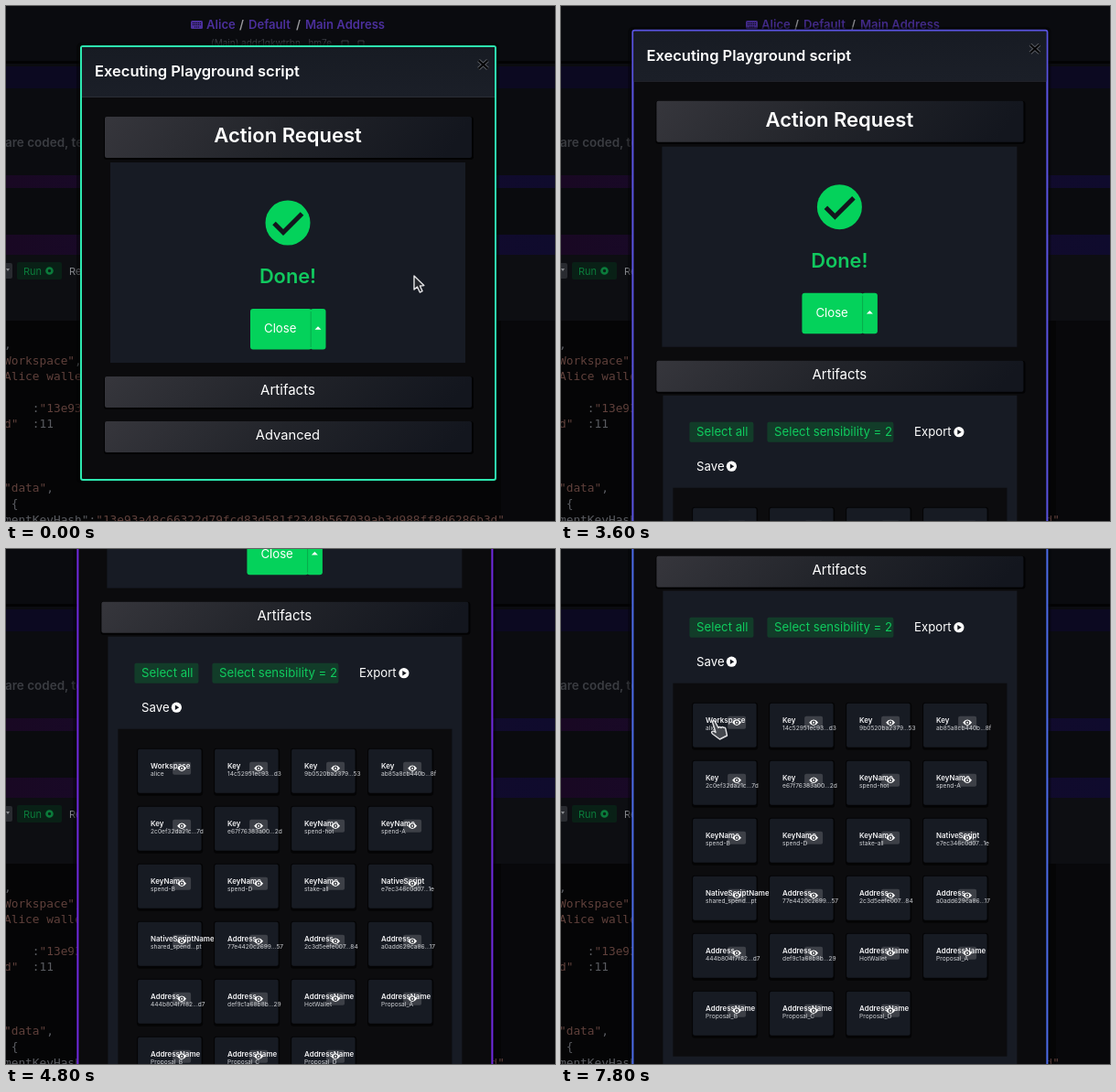
Recreate the animation shown at these times as an HTML page. Size 600 by 563 pixels, loop 8000 ms.

```html
<!DOCTYPE html>
<html lang="en">
<head>
<meta charset="utf-8">
<title>Playground dialog</title>
<style>
  html, body { margin: 0; width: 100%; height: 100%; overflow: hidden; background: #0a0b0f; }
  svg { display: block; width: 100vw; height: 100vh; font-family: Inter, sans-serif; }
  text { white-space: pre; }
  .code { font: 12.8px "DejaVu Sans Mono", monospace; fill: #595b60; }
  .str { fill: #5f403b; }
  .mid { text-anchor: middle; }
  .name { font-size: 7.9px; font-weight: 600; fill: #f2f2f4; }
  .value { font-size: 6.6px; fill: #d2d4d8; }
</style>
</head>
<body>
<svg viewBox="0 0 600 563">
  <defs>
    <linearGradient id="bar" x2="1" y2=".08">
      <stop stop-color="#36363c"/><stop offset=".5" stop-color="#22242a"/><stop offset="1" stop-color="#13161e"/>
    </linearGradient>
    <linearGradient id="band">
      <stop stop-color="#190823"/><stop offset=".3" stop-color="#180a2b"/><stop offset="1" stop-color="#0f0b2d"/>
    </linearGradient>
    <linearGradient id="head" x2="0" y2="1">
      <stop stop-color="#171b23"/><stop offset="1" stop-color="#1b1f28"/>
    </linearGradient>
    <g id="play">
      <circle r="5.6" fill="#fff"/><path d="M-1.6-2.8 2.8 0-1.6 2.8Z" fill="#14171e"/>
    </g>
    <g id="eye">
      <path d="M-5 0Q0-6.4 5 0Q0 6.4-5 0Z" fill="#fff"/>
      <circle r="2.2" fill="#34363c"/><circle r="1" fill="#fff"/>
    </g>
  </defs>

  <g id="page">
    <rect width="600" height="563" fill="#0b0c10"/>
    <rect width="600" height="61" fill="#0a0b0f"/>
    <rect y="60" width="600" height="3" fill="#030304"/>
    <rect y="66" width="600" height="24" fill="#0c0921"/>
    <rect y="185" width="600" height="14" fill="url(#band)"/>
    <rect y="199" width="600" height="51" fill="#0a0b0e"/>
    <rect y="250" width="600" height="22" fill="url(#band)"/>
    <rect y="272" width="600" height="72" fill="#0d0e12"/>
    <rect y="344" width="541" height="219" fill="#050506"/>
    <rect x="541" y="344" width="59" height="219" fill="#08080b"/>
    <g id="crumbs" font-size="13.1" font-weight="600" fill="#4b2f9c">
      <rect x="202" y="16" width="13" height="9" rx="1.5"/>
      <path d="M204 18.5h9M204 20.5h9M206 23h5" stroke="#0a0b0f" stroke-dasharray="1.2 .8"/>
      <text x="219" y="25">Alice</text><text x="265" y="25">Default</text><text x="327" y="25">Main Address</text>
      <g fill="#9a9a9e"><text x="255" y="25">/</text><text x="317" y="25">/</text></g>
      <text x="224" y="44" font-size="10" font-weight="400" fill="#383a40">(Main) addr1qkwtrbn...hm7e</text>
      <path d="M367 38h7v6h-7zM385 38h6v6h-6z" fill="none" stroke="#383a40"/>
    </g>
    <text x="-1" y="154" font-size="13.5" font-weight="600" fill="#3a3c41">are coded, tested</text>
    <rect x="-6" y="281" width="13" height="17" rx="2" fill="#292b30"/>
    <path d="M0 287h4l-2 3z" fill="#8a8c90"/>
    <rect x="12" y="280" width="49" height="19" rx="2" fill="#092016"/>
    <text x="19" y="293.5" font-size="11" fill="#0b7b3b">Run</text>
    <circle cx="47.500" cy="289.500" r="3" fill="none" stroke="#0b7b3b" stroke-width="2.6"/>
    <text x="69" y="293.5" font-size="11" fill="#86888d">Reset</text>
    <g id="code"></g>
  </g>

  <g id="dialog">
    <rect id="shade" x="77" y="40" width="462" height="482" rx="5" fill="#000" opacity=".4"/>
    <rect id="frame" x="82" y="44" width="453" height="474" rx="2" fill="#0b0b0d" stroke-width="2"/>
    <rect x="83" y="45" width="451" height="54" fill="url(#head)"/>
    <rect x="83" y="99" width="451" height="1" fill="#2a2d35"/>
    <text x="97" y="77" font-size="16.5" font-weight="600" fill="#fff">Executing Playground script</text>
    <path d="M516.500 59.500l10 9m0-9l-10 9" stroke="#5a5d64" stroke-width="4"/>
    <path d="M516.500 59.500l10 9m0-9l-10 9" stroke="#050506" stroke-width="2.2"/>
    <g id="bars"></g>
    <rect x="114" y="171" width="388" height="219" fill="#171b24"/>
    <circle cx="308" cy="237" r="24.5" fill="#04d25b"/>
    <path d="M293 237.500l10 10 20.500-20.500" fill="none" stroke="#12161d" stroke-width="5"/>
    <text class="mid" x="308" y="303" font-size="21.8" font-weight="600" fill="#11c95f">Done!</text>
    <rect x="267" y="331" width="67" height="44.500" rx="3" fill="#04d25b"/>
    <rect x="332.500" y="331" width="17" height="44.500" rx="3" fill="#04d25b"/>
    <path d="M333.200 334v39" stroke="#08a94c"/>
    <path d="M337.500 353.800h7l-3.500-3.600z" fill="#fff"/>
    <text x="282" y="357.3" font-size="13.2" fill="#fff">Close</text>
    <g id="artifacts">
      <rect x="115" y="443" width="387" height="560" fill="#171b24"/>
      <g font-size="13.200" fill="#10cb5e">
        <rect x="144" y="472" width="70" height="22" rx="2" fill="#123c29"/>
        <rect x="229" y="472" width="138" height="22" rx="2" fill="#123c29"/>
        <text x="151.700" y="487.300">Select all</text>
        <text x="236.700" y="487.300">Select sensibility = 2</text>
        <g fill="#fff"><text x="389.700" y="487.800">Export</text><text x="151.700" y="525.300">Save</text></g>
      </g>
      <use href="#play" x="438.500" y="483"/>
      <use href="#play" x="190" y="520.500"/>
      <rect x="126" y="544" width="365" height="408" fill="#0c0c0e"/>
      <g id="cards"></g>
    </g>
  </g>

  <g id="cursor" stroke-linejoin="round" stroke="#e4e4e6" stroke-width="1.4">
    <path id="arrow" fill="#24262b" d="M0 0v15l3.500-3 2.800 6 2.800-1.300-2.700-5.700 4.400-.4z"/>
    <path id="hand" fill="#45484e" d="M-2.500 1Q-2-1 0 0L4 7.500Q5 5.500 7 7.500Q8 5.700 9.800 7.400Q11.500 6.500 12 9L13.500 16L5.500 20L-.5 15.500Q-4.500 13-3 11.500Q-1.500 10.500 1 12.500Z"/>
  </g>
</svg>
<script>
const LOOP = 8000, STEP = 200, OPEN_AT = 2400;
const byId = id => document.getElementById(id);
const show = (id, on) => byId(id).setAttribute('display', on ? 'inline' : 'none');

// Row number: parts given as column, text and whether it is a string literal.
const codeLines = {
  0: [[0, ',']],
  1: [[0, 'Workspace"', 1], [10, ',']],
  2: [[0, 'Alice wallet"', 1]],
  4: [[4, ':'], [5, '"13e93a48c6"', 1]],
  5: [[0, 'd"', 1], [4, ':11']],
  9: [[0, '"data"', 1], [6, ',']],
  10: [[1, '{']],
  11: [[0, 'mentKeyHash":'], [13, '"13e93a48c66322d79fcd83d581f2348b567039ab3d988ff8d6286b3d"', 1]]
};
byId('code').innerHTML = Object.entries(codeLines).map(([row, parts]) => parts.map(([col, s, str]) =>
  `<text class="code ${str ? 'str' : ''}" x="${-2 + col * 7.706}" y="${374.3 + row * 17.4}">${s}</text>`
).join('')).join('');

const bar = (y, h, label, size, weight, base) => `
  <rect x="107" y="${y}" width="404" height="${h + 2}" rx="3" fill="#020203"/>
  <rect x="108" y="${y}" width="401" height="${h}" rx="2" fill="url(#bar)"/>
  <text class="mid" x="308" y="${base}" font-size="${size}" font-weight="${weight}" fill="#fff">${label}</text>`;
byId('bars').innerHTML = bar(121, 45, 'Action Request', 22, 600, 149)
  + bar(405, 34, 'Artifacts', 15, 400, 425)
  + `<g id="advanced">${bar(454, 34, 'Advanced', 14.7, 400, 474)}</g>`;

const cards = `Workspace alice|Key 14c52951ec93...d3|Key 9b0520ba2379...53|Key ab85a8cb440b...8f
Key 2c0ef32da21c...7d|Key e67f76383a00...2d|KeyName spend-hot|KeyName spend-A
KeyName spend-B|KeyName spend-D|KeyName stake-all|NativeScript e7ec346c0d07...1e
NativeScriptName shared_spend...pt|Address 77e4420c2699...57|Address 2c3d5eefe007...84|Address a0add629ca86...17
Address 444b804f7f82...d7|Address def9c1a68b8b...29|AddressName HotWallet|AddressName Proposal_A
AddressName Proposal_B|AddressName Proposal_C|AddressName Proposal_D`.split(/[|\n]/);
byId('cards').innerHTML = cards.map((card, i) => {
  const [name, value] = card.split(' ');
  return `<g transform="translate(${147.7 + i % 4 * 84} ${566 + Math.floor(i / 4) * 63})">
    <rect x="-1" y="-1" width="72" height="52" rx="3" fill="#040405"/>
    <rect width="69.500" height="48" rx="2" fill="#171b23"/>
    <rect x="38" y="14" width="20" height="14" rx="2" fill="#3d4047"/>
    <text class="name" x="14" y="21.500">${name}</text>
    <text class="value" x="14" y="29.700">${value}</text>
    <use href="#eye" x="48" y="21"/></g>`;
}).join('');

// Each row: time, then the values reached at that time.
const border = [
  [0, 45, 232, 176], [2200, 58, 204, 184], [3000, 74, 140, 214], [3600, 90, 84, 226],
  [4000, 102, 64, 238], [4800, 112, 42, 224], [5400, 142, 46, 238], [6200, 124, 48, 238],
  [7000, 96, 72, 236], [7800, 76, 108, 232]
];
const scroll = [
  [3600, 0], [3800, 40], [4000, 101.5], [4400, 250], [4800, 330], [5200, 365], [5400, 370], [5600, 380]
];
const pointer = [
  [0, 446, 295], [800, 446, 295], [1400, 400, 350], [2000, 320, 422],
  [2600, 320, 422], [3400, 615, 330], [6200, 615, 300], [6800, 360, 250], [7400, 168, 188]
];

function sample(rows, t) {
  const next = rows.findIndex(row => row[0] > t);
  if (next === 0) return rows[0].slice(1);
  if (next < 0) return rows[rows.length - 1].slice(1);
  const a = rows[next - 1], b = rows[next];
  const k = (t - a[0]) / (b[0] - a[0]);
  return a.slice(1).map((v, i) => v + (b[i + 1] - v) * k);
}

function draw(t) {
  const open = t >= OPEN_AT;
  const [offset] = sample(scroll, t);
  byId('dialog').setAttribute('transform', open ? `translate(-3.6 ${-17.3 - offset})` : '');
  byId('frame').setAttribute('height', open ? 1040 : 474);
  byId('shade').setAttribute('height', open ? 1048 : 482);
  byId('frame').setAttribute('stroke', `rgb(${sample(border, t).map(Math.round)})`);
  byId('crumbs').setAttribute('opacity', open ? .85 : 1);
  show('artifacts', open);
  show('advanced', !open);

  const [x, y] = sample(pointer, t);
  const hand = t < 2800 ? y >= 405 : t >= 7000;
  byId('cursor').setAttribute('transform', `translate(${x} ${y})`);
  show('hand', hand);
  show('arrow', !hand);
}

const start = performance.now();
function tick() {
  const t = (performance.now() - start) % LOOP;
  draw(Math.floor(t / STEP) * STEP);
  requestAnimationFrame(tick);
}
draw(0);
tick();
</script>
</body>
</html>
```
